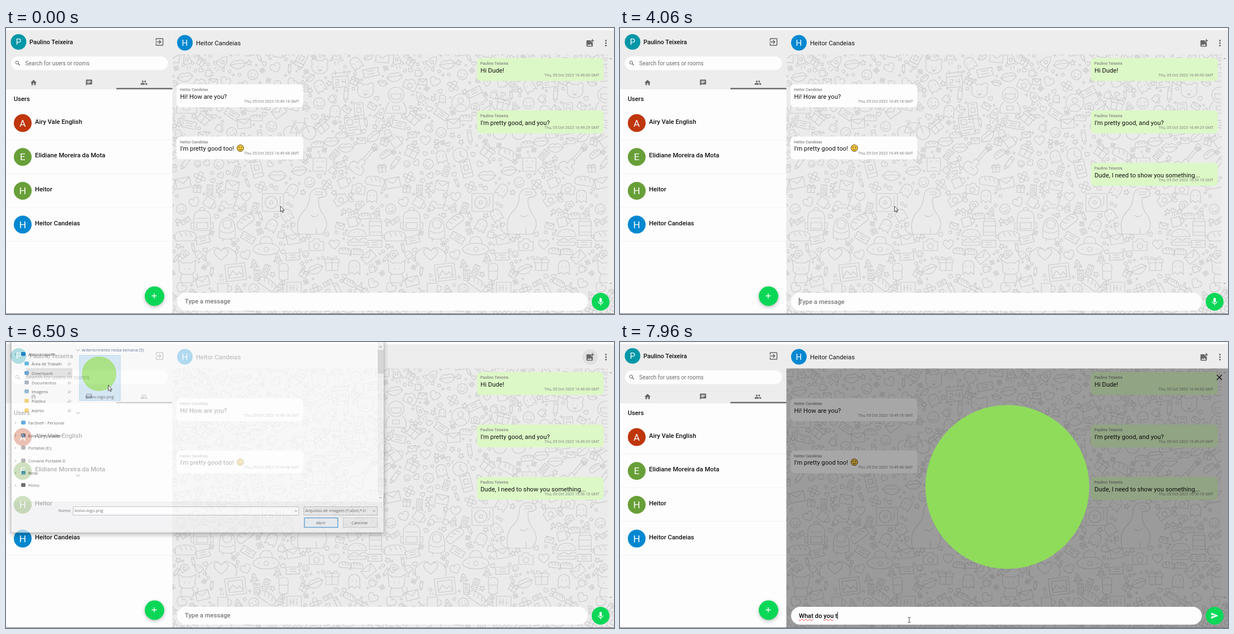
Animation, 1091 px wide and 513 px high, one loop 8000 ms. Source, as an HTML page with a canvas:

```html
<!DOCTYPE html>
<html lang="en">
<head>
<meta charset="utf-8">
<title>Chat</title>
<style>
html, body { margin: 0; width: 100%; height: 100%; overflow: hidden; background: #fdfdfd; }
canvas, svg, #field { position: absolute; left: 0; top: 0; }
svg, #field { font-family: Roboto, sans-serif; }
#field { left: 321px; top: 484px; font: 500 11.2px/14px Roboto, sans-serif; white-space: pre; letter-spacing: .03px; }
#field i { display: inline-block; width: 1px; height: 13px; margin-right: -1px; background: #222; vertical-align: -2px; }
#field u { text-decoration: underline wavy #e0403c 1px; text-underline-offset: 1px; text-decoration-skip-ink: none; }
#field em { font-style: normal; color: #777; }
#dialog { transform-origin: 343.5px 95px; filter: drop-shadow(0 3px 4px #0006); font-family: "Open Sans", sans-serif; }
</style>
</head>
<body>
<canvas id="wall" width="1091" height="513"></canvas>
<svg id="stage" width="1091" height="513"></svg>
<div id="field"></div>
<script>
const $ = id => document.getElementById(id);
const LOOP = 8000, GREEN = '#0bd757', TILE = 376;

// ---- wallpaper: hand-placed doodles, gaps filled by seeded scatter ----
const ring = (r, x = 0, y = 0) => `M${x - r} ${y}a${r} ${r} 0 1 1 ${2 * r} 0a${r} ${r} 0 1 1 ${-2 * r} 0`;
const eyes = 'M-4-3v2M4-3v2';
const art = {
  calendar: 'M-14-12h28v26h-28zM-14-5h28M-8-16v7M8-16v7M-9 0h6v5h-6v5h6M3 0v5h6M9 0v10',
  bear: 'M-13-8a5 5 0 1 1 8-5q5-2 10 0a5 5 0 1 1 8 5q4 9-3 15-10 6-20 0-7-6-3-15M-3 3h6l-3 3z' + eyes,
  astronaut: ring(14, 0, -10) + 'M-9-12h18v7q-9 6-18 0zM-12 3q-8 8-6 20h36q2-12-6-20M-6 10h12v7h-12z',
  user: ring(16) + ring(5, 0, -4) + 'M-10 11q1-8 10-8t10 8',
  bike: ring(12, -16, 6) + ring(12, 18, 6) + 'M-16 6l7-18h20l7 18M-9-12l10 18 10-18M-13-15h9M11-12l-2-8h7M-16 6h17',
  news: 'M-13-16h26v32h-26zM-9-12h10v9h-10zM4-11h6M4-6h6M-9 2h19M-9 7h19M-9 12h12',
  clock: ring(13) + 'M0-8v8l6 4M-13-9l-3-4 5-3M13-9l3-4-5-3',
  guitar: 'M-5 8q-10-2-10 8t15 9 13-9q0-9-9-8v-4q3-7-4-8t-5 6zM-3-4v-26h5v26M-5-30h9v-9h-9zM-4 14h8',
  radio: 'M-12-10h24v24h-24zM-6-4h3M4-4h3M-5 7h10M0-10v-6',
  phone: 'M-9-16h18v32h-18zM-9 9h18M-4-12h8M-4-6h8v9h-8z',
  lips: 'M-16 0q8-10 13-8 3 3 6 0 6-2 13 8-8 9-16 9t-16-9q16-3 32 0',
  mail: 'M-13-9h26v18h-26zM-13-9l13 10 13-10',
  camera: 'M-13-7h6l3-5h8l3 5h6v16h-26z' + ring(5, 0, 1),
  vinyl: 'M-19-16h38v32h-38z' + ring(11, -3) + ring(3, -3) + 'M13-11v14l-4 5',
  scooter: ring(5, -13, 8) + ring(5, 13, 8) + 'M-8 8h16l6-18h-6M-15 2q1-8 9-6l4 6h8',
  backpack: 'M-15 18v-22q0-14 15-14t15 14v22zM-5-18q0-5 5-5t5 5M-10 4h20v11h-20zM-10-4h20M-15 4h-5v11h5M15 4h5v11h-5',
  kid: 'M-14 16q-3-34 14-36 17 2 14 36-14 6-28 0M-12 4q12 8 24 0M-8 18v5M8 18v5' + ring(8, 0, -8),
  dino: 'M-30 38q-6-26 8-40 12-12 12-28 2-16 20-14 12 4 10 12-4 4-14 4-2 18 8 30 14 20-2 36zM0-38h12v5h-12M-30 38q-18-4-12-22M-8 4q8 6 14-2M2 38v-12',
  burger: 'M-17-2q2-13 17-13t17 13zM-17 3q4 4 8 0t8 0 8 0 10 0M-17 8h34q0 6-6 6h-22q-6 0-6-6M-6-9h1M3-10h1M8-6h1',
  jar: 'M-9-14h18v5h-18zM-11-9h22v25h-22zM-11-1h22M-11 10h22',
  saucer: 'M-24 4q4-11 24-11t24 11q-4 10-24 10t-24-10M-11-6q0-13 11-13t11 13M-15 4h3M12 4h3' + ring(4, 0, 4),
  loaf: 'M-19 4q-2-12 19-12t19 12q0 6-5 6h-28q-5 0-5-6M-10-5l4 7M-1-6l4 7M8-5l4 7',
  hands: 'M-26 14q-6-14 6-22 12-10 20 2 8-12 20-2 12 8 6 22M0-6q-6-8-12-2-3 8 12 18 15-10 12-18-6-6-12 2',
  picture: 'M-18-15h36v30h-36zM-13-10h26v20h-26zM-13 8l8-11 7 8 5-5 6 8',
  ice: 'M-8-4q-3-14 8-14t8 14zM-8-4v14q8 5 16 0v-14M-2 13v8h4v-8',
  cat: 'M-14-4l-2-14 9 6q7-2 14 0l9-6-2 14q3 12-14 12t-14-12M-9 7q-5 10-1 16h20q4-8-1-16M10 20q12 0 8-14' + eyes,
  cup: 'M-10-9h18v18h-18zM8-5q8 0 7 6t-7 5M-5-13v-4M0-13v-4M5-13v-4',
  hi: 'M-13-10h26v20h-18l-6 6v-6h-2zM-7-5v10M-7 0h6M-1-5v10M5-1v6M5-5v1',
  gift: 'M-11-4h22v14h-22zM-13-10h26v6h-26zM0-10v20M0-10q-9-8-9-2M0-10q9-8 9-2',
  ghost: 'M-10 12v-14q0-11 10-11t10 11v14l-5-4-5 4-5-4z' + eyes,
  rocket: 'M0-18q9 8 7 22h-14q-2-14 7-22M-7-2l-6 8 6 1M7-2l6 8-6 1M-3 8v6M3 8v6' + ring(3, 0, -5),
  flower: ring(4) + 'M-4-3q-2-8 4-8t4 8q8-2 8 3t-8 3q2 8-4 8t-4-8q-8 2-8-3t8-3',
  pencil: 'M-4-14h8v22l-4 7-4-7zM-4-9h8M-4 8h8',
  smile: ring(10) + eyes + 'M-5 3q5 5 10 0',
  ticket: 'M-14-7h28v5q-4 2 0 4v5h-28v-5q4-2 0-4zM-6-3h12M-6 2h12',
  heart: 'M0 9q-14-9-9-16 6-5 9 2 3-7 9-2 5 7-9 16',
  dot: ring(2.6), bead: ring(1.5), plus: 'M-3 0h6M0-3v6',
  star: 'M0-5l1.5 3.5 3.5.5-2.5 2.5.5 3.5-3-2-3 2 .5-3.5-2.5-2.5 3.5-.5z'
};
const placed = `calendar 600 92, bear 563 72, bear 645 115, astronaut 324 130, user 440 134, bike 526 182,
news 622 176, clock 439 228, guitar 640 240, radio 563 243, phone 450 252, lips 487 265, mail 318 278,
vinyl 479 313, scooter 400 315, backpack 352 345, kid 397 360, dino 555 332, burger 630 376, jar 663 356,
saucer 467 393, loaf 322 372, hands 386 406, picture 412 438, ice 498 440, cat 325 434, cup 390 467,
hi 517 466, gift 585 425, ghost 625 430, rocket 385 65, camera 557 390, ticket 655 80, smile 562 135`;
const reach = { dino: 38, bike: 27, guitar: 26, astronaut: 24, hands: 24, saucer: 21, kid: 21, cat: 20, backpack: 20, vinyl: 20, picture: 19 };
const tilt = { guitar: .7, rocket: .7, news: -.15, calendar: -.1, phone: -.25, mail: -.2, picture: -.12, ticket: -.2 };

function paintWall() {
  const c = $('wall').getContext('2d'), spots = [];
  let seed = 11;
  const rnd = () => (seed = seed * 16807 % 2147483647) / 2147483647;
  const stamp = (name, x, y, r, turn, size) => {
    spots.push([x, y, r]);
    for (let k = -1; k < 3; k++) {
      c.save();
      c.translate(x + k * TILE, y);
      c.rotate(turn);
      c.scale(size, size);
      c.lineWidth = 1.15 / size;
      c.stroke(new Path2D(art[name]));
      c.restore();
    }
  };
  const scatter = (names, tries, r, size, gap) => {
    while (tries--) {
      const x = 299 + rnd() * TILE, y = 44 + rnd() * 470;
      const free = spots.every(([a, b, q]) => {
        const d = Math.abs(a - x);
        return Math.hypot(Math.min(d, TILE - d), b - y) > q + r + gap;
      });
      if (free) stamp(names[rnd() * names.length | 0], x, y, r, rnd() * 1.4 - .7, size);
    }
  };
  c.fillStyle = '#ebebeb';
  c.fillRect(298, 47, 793, 466);
  c.strokeStyle = '#cbcbcb';
  c.lineJoin = c.lineCap = 'round';
  placed.split(',').forEach(p => {
    const [name, x, y] = p.trim().split(' ');
    stamp(name, +x, +y, reach[name] || 16, tilt[name] || 0, 1);
  });
  const mid = 'mail camera pencil smile ticket heart flower cup gift ghost rocket loaf lips phone'.split(' ');
  scatter(mid, 1500, 13, .9, 0);
  scatter(mid, 2500, 8, .58, 0);
  scatter(['heart', 'flower'], 1500, 5, .42, .5);
  scatter(['dot', 'bead', 'plus', 'star', 'dot'], 4000, 3, 1, 1);
}

// ---- interface ----
const text = (x, y, s, size = 11.2, fill = '#111', more = '') =>
  `<text x="${x}" y="${y}" font-size="${size}" fill="${fill}" ${more}>${s}</text>`;
const rect = (x, y, w, h, fill, more = '') =>
  `<rect x="${x}" y="${y}" width="${w}" height="${h}" fill="${fill}" ${more}/>`;
const disc = (x, y, r, fill, more = '') => `<circle cx="${x}" cy="${y}" r="${r}" fill="${fill}" ${more}/>`;
const line = (d, stroke, more = '') => `<path d="${d}" fill="none" stroke="${stroke}" ${more}/>`;
const icon = (d, x, y, k, fill = '#666', more = '') =>
  `<path d="${d}" fill="${fill}" transform="translate(${x - 12 * k} ${y - 12 * k}) scale(${k})" ${more}/>`;
const MID = 'text-anchor="middle"', END = 'text-anchor="end"', BOLD = 'font-weight="500"';
const avatar = (x, y, r, s, fill) => disc(x, y, r, fill) + text(x, y + r * .38, s, r * 1.08, '#fff', MID);

const me = 'Paulino Teixeira', friend = 'Heitor Candeias', file = 'bolvo-logo.png';
const line1 = 'Dude, I need to show you something...', line2 = 'What do you t';

function bubble(y, mine, msg, time) {
  const x = mine ? 845 : 306;
  return rect(x, y, 227.5, 41, mine ? '#dcf8c6' : '#fdfdfd', 'rx="7"') +
    text(x + 6, y + 12, mine ? me : friend, 7.1, '#858585', 'font-weight="500"') +
    text(x + 6.5, y + 25.5, msg, 11.2, '#111', 'letter-spacing=".03"') +
    text(x + 220, y + 32.5, `Thu, 05 Oct 2023 16:${time} GMT`, 7.05, '#858585', END);
}

const I = {
  home: 'M10 20v-6h4v6h5v-8h3L12 3 2 12h3v8z',
  chat: 'M20 2H4c-1.1 0-2 .9-2 2v18l4-4h14c1.1 0 2-.9 2-2V4c0-1.1-.9-2-2-2zM6 9h12v2H6V9zm8 5H6v-2h8v2zm4-6H6V6h12v2z',
  group: 'M16 11a3 3 0 1 0 0-6 3 3 0 0 0 0 6zM8 11a3 3 0 1 0 0-6 3 3 0 0 0 0 6zm0 2c-2.33 0-7 1.17-7 3.5V19h14v-2.5c0-2.33-4.67-3.5-7-3.5zm8 0c-.29 0-.62.02-.97.05 1.16.84 1.97 1.97 1.97 3.45V19h6v-2.5c0-2.33-4.67-3.5-7-3.5z',
  exit: 'M10.09 15.59L11.5 17l5-5-5-5-1.41 1.41L12.67 11H3v2h9.67zM19 3H5c-1.11 0-2 .9-2 2v4h2V5h14v14H5v-4H3v4c0 1.1.89 2 2 2h14c1.1 0 2-.9 2-2V5c0-1.1-.9-2-2-2z',
  photo: 'M19 7v3h-2V7h-3V5h3V2h2v3h3v2zm-3 4V8h-3V5H5c-1.1 0-2 .9-2 2v12c0 1.1.9 2 2 2h12c1.1 0 2-.9 2-2v-8zM5 19l3-4 2 3 3-4 4 5z',
  mic: 'M12 14c1.66 0 3-1.34 3-3V5a3 3 0 0 0-6 0v6c0 1.66 1.34 3 3 3zm5.3-3c0 3-2.54 5.1-5.3 5.1S6.7 14 6.7 11H5c0 3.41 2.72 6.23 6 6.72V21h2v-3.28c3.28-.48 6-3.3 6-6.72z',
  send: 'M2 21L23 12 2 3v7l15 2-15 2z',
  add: 'M19 13h-6v6h-2v-6H5v-2h6V5h2v6h6z',
  close: 'M19 6.41L17.59 5 12 10.59 6.41 5 5 6.41 10.59 12 5 17.59 6.41 19 12 13.41 17.59 19 19 17.59 13.41 12z'
};

const contacts = [['Airy Vale English', '#bf360c'], ['Elidiane Moreira da Mota', '#689f38'], ['Heitor', '#689f38'], [friend, '#0288d1']];
const sidebar = rect(0, 0, 298.5, 513, '#fdfdfd') + rect(0, 4, 298.5, 106, '#ededed') +
  avatar(22.5, 25, 14, 'P', '#0097a7') + text(42, 28.5, me, 11, '#111', BOLD) + icon(I.exit, 275.5, 25, .76) +
  rect(9, 51, 281.5, 24.5, '#fdfdfd', 'rx="12.2"') + disc(20, 62, 2.7, 'none', 'stroke="#666"') +
  line('M22 64l3 3', '#666', 'stroke-width="1.3"') + text(34.5, 66.5, 'Search for users or rooms', 10, '#6d6d6d') +
  icon(I.home, 49.5, 98, .55) + icon(I.chat, 149, 98, .55) + icon(I.group, 247.5, 98, .55) +
  rect(198, 107.5, 100.5, 2.5, '#6c6c6c') + text(14, 131, 'Users', 11.2, '#111', BOLD) +
  contacts.map(([name, fill], i) => {
    const y = 170.5 + i * 60.7;
    return avatar(30, y, 16, name[0], fill) + text(52, y + 1, name, 11.3, '#111', BOLD) +
      rect(0, y + 29.5, 298, 1, '#f3f3f3');
  }).join('') +
  disc(266.5, 481, 17.5, GREEN, 'style="filter:drop-shadow(0 2px 3px #0004)"') + icon(I.add, 266, 480.5, .66, '#fff');

const chat = rect(298.5, 0, 793, 4, '#fdfdfd') + rect(298.5, 4, 793, 43.5, '#ededed') +
  avatar(321, 26.5, 14, 'H', '#0288d1') + text(341, 31, friend, 11.3) +
  disc(1048, 27, 14, '#0000000d', 'id="hover"') + icon(I.photo, 1048, 27, .72) +
  [-4.5, 0, 4.5].map(d => disc(1076.5, 27 + d, 1.5, '#666')).join('') +
  rect(1079.5, 47.5, 12, 416, '#eeeeee') + line('M1083 56l2-2 2 2M1083 457l2 2 2-2', '#888') +
  bubble(54, 1, 'Hi Dude!', '49:00') + bubble(101, 0, 'Hi! How are you?', '49:18') +
  bubble(148, 1, "I'm pretty good, and you?", '49:29') + bubble(194.5, 0, "I'm pretty good too!", '49:48') +
  disc(420.5, 215.5, 6, '#fbc83c', 'stroke="#5b4a20"') + disc(418.3, 214, .9, '#443') + disc(422.7, 214, .9, '#443') +
  line('M417.5 217.5q3 3 6 0', '#443') +
  `<g id="sent">${bubble(242, 1, line1, '50:18')}</g>` +
  `<g id="preview">${rect(298.5, 47.5, 793, 465, '#000', 'opacity=".34"')}${disc(695, 260, 147, '#8fdc5b')}${icon(I.close, 1075.5, 63.5, .72, '#111')}</g>` +
  rect(307, 475, 737, 32, '#fdfdfd', 'rx="16"') + disc(1067, 491, 16, GREEN) +
  icon(I.mic, 1067, 491, .7, '#fff', 'id="mic"') + icon(I.send, 1067, 491, .62, '#fff', 'id="send"') +
  rect(0, 512, 1091, 1, '#777');

// ---- file dialog ----
const small = (x, y, s, more) => text(x, y, s, 7.4, '#333', more);
const tree = [['Acesso rápido', 22, '#2d7fd0'], ['Área de Trabalh', 39, '#29a3d8'], ['Downloads', 56, '#2f7fc1'], ['Documentos', 73, '#8796a5'],
  ['Imagens', 89, '#6fa3c8'], ['Público', 106, '#f3c74b'], ['Admin', 123, '#f3c74b'], ['FarShelf - Personal', 145, '#1e88d2'],
  ['Este Computador', 168, '#4b87b5'], ['Portable (E:)', 190, '#999'], ['Corvane Portable D', 213, '#999'], ['Rede', 235, '#3f8fc4'], ['Pinho', 257, '#333']];
const dialog = rect(9, -150, 669, 492, '#fdfdfd', 'stroke="#8a8a8a"') + rect(9.5, 286, 668, 55.5, '#f0f0f2') +
  rect(667, -100, 11, 375, '#f0f0f0') + rect(667, 13, 11, 196, '#cdcdcd', 'id="thumb"') +
  rect(93, 297, 25, 11, '#fff', 'id="labelBox"') + rect(120.5, 295, 406, 16, '#fff') + rect(534.5, 295, 132, 16, '#fff') +
  rect(535.5, 315.5, 60, 17, '#fff') + rect(605.5, 315.5, 61, 17, '#fff') +
  '<g id="content">' + rect(667, 14, 11, 43, '#cdcdcd') + rect(36, 47, 83, 17, '#d9d9d9') +
  tree.map(([s, y, fill], i) => {
    const sub = i > 0 && i < 7;
    return rect(sub ? 33 : 27, y - 4, 8, 7, fill, 'rx="2"') + small(sub ? 46 : 40, y + 2.7, s) +
      (sub ? line(`M111 ${y + 3}l2-2m-2-2l4 4m-2-6l4 4`, '#888') : line(`M16 ${y - 2}l2 2-2 2`, '#999'));
  }).join('') +
  line('M126 13l3 3 3-3M126 126l3 3 3-3M126 238l3 3 3-3', '#777') + text(136, 17, 'Anteriormente nesta semana (5)', 7.4, '#27407c') +
  rect(132, 24, 73, 81, '#cce5f8', 'stroke="#9bcdf0" id="tile"') + disc(167, 57, 31, '#8fdc5b') + small(168, 101.5, file, MID) +
  line('M669.5 10l2.5-2.5 2.5 2.5M669.5 278l2.5 2.5 2.5-2.5', '#555') + small(117, 305.5, 'Nome:', END) +
  rect(120.5, 295.5, 405, 15, '#fff', 'stroke="#aaa"') + small(123, 305.5, file, 'id="picked"') +
  rect(534.5, 295.5, 132, 15, '#e6e6e6', 'stroke="#aaa"') + small(537, 305.5, 'Arquivos de imagem (*.xbm;*.ti') +
  line('M518 302l2.5 2.5 2.5-2.5M658 302l2.5 2.5 2.5-2.5', '#666') +
  rect(535.5, 315.5, 60, 17, '#e4e9ee', 'stroke="#2a80c9" stroke-width="1.4"') + small(565, 327, 'Abrir', MID) +
  rect(605.5, 315.5, 61, 17, '#e4e4e4', 'stroke="#bbb"') + small(635, 327, 'Cancelar', MID) + '</g>';

$('stage').innerHTML = sidebar + chat + `<g id="dialog">${dialog}</g>` +
  '<path id="arrow" d="M.5.5v10l2.3-2 1.5 3.4 1.6-.7-1.5-3.3h3z" fill="#fff" stroke="#333" stroke-width=".9"/>' +
  line('M516.5 494h2l.5.5.5-.5h2M519 494.5v8M516.5 503h2l.5-.5.5.5h2', '#444', 'id="beam"');

// ---- motion ----
const bursts = [[60, 360, 5], [530, 1260, 13], [2030, 2530, 21], [2700, 3060, 30], [3200, 3560, 34], [3730, 3860, 37]];
const pointer = [[0, 492, 319], [4360, 492, 319], [4960, 996, 22], [5160, 1040, 25], [5330, 1040, 25],
  [5400, 1026, 37], [5700, 1026, 37], [5860, 520, 110], [6100, 520, 110], [6300, 183, 77], [LOOP, 183, 77]];
const SENT = 4060, clamp = v => Math.max(0, Math.min(1, v));

function typedCount(t, list) {
  let n = 0;
  for (const [from, to, end] of list) {
    if (t < from) break;
    n += 1 + Math.round(clamp((t - from) / (to - from)) * (end - n - 1));
  }
  return n;
}

function pointerAt(t) {
  const i = pointer.findIndex(p => p[0] > t), [t0, x0, y0] = pointer[i - 1], [t1, x1, y1] = pointer[i];
  const p = (t - t0) / (t1 - t0), e = p * p * (3 - 2 * p);
  return [Math.round(x0 + (x1 - x0) * e), Math.round(y0 + (y1 - y0) * e)];
}

let shown;
function drawField(t) {
  const typed = t < SENT ? line1.slice(0, typedCount(t, bursts)) : line2.slice(0, typedCount(t, [[7330, 7960, 13]]));
  const off = t < 60 || (t >= 1400 && t < 1560) || (t >= 1700 && t < 1860) || (t >= 4360 && t < 6930) || (t >= 7080 && t < 7160);
  const caret = off ? '' : '<i></i>';
  const html = typed ? typed.replace(/\b(Dude|need|to|What)(?=[ ,])|\byou(?= t)/g, '<u>$&</u>') + caret : caret + '<em>Type a message</em>';
  if (html !== shown) $('field').innerHTML = shown = html;
}

const show = (id, on) => $(id).style.display = on ? '' : 'none';

function frame() {
  const t = performance.now() % LOOP;
  drawField(t);
  const preview = t >= 6640, loaded = t >= 5720, picked = t >= 6250;
  show('sent', t >= SENT);
  show('hover', t >= 5330 && t < 6640);
  show('preview', preview);
  show('send', preview);
  show('mic', !preview);
  show('dialog', t >= 5560 && t < 6560);
  show('content', loaded);
  show('thumb', !loaded);
  show('labelBox', !loaded);
  show('tile', picked);
  show('picked', picked);
  const open = clamp((t - 5540) / 80), shut = clamp((t - 6440) / 120);
  $('dialog').style.opacity = open * (1 - shut ** 1.75);
  $('dialog').style.transform = `scale(${.95 + .062 * open - .024 * shut})`;
  show('arrow', t < 6560);
  show('beam', t >= 6930);
  $('arrow').setAttribute('transform', `translate(${pointerAt(t)})`);
  requestAnimationFrame(frame);
}

paintWall();
frame();
</script>
</body>
</html>
```
